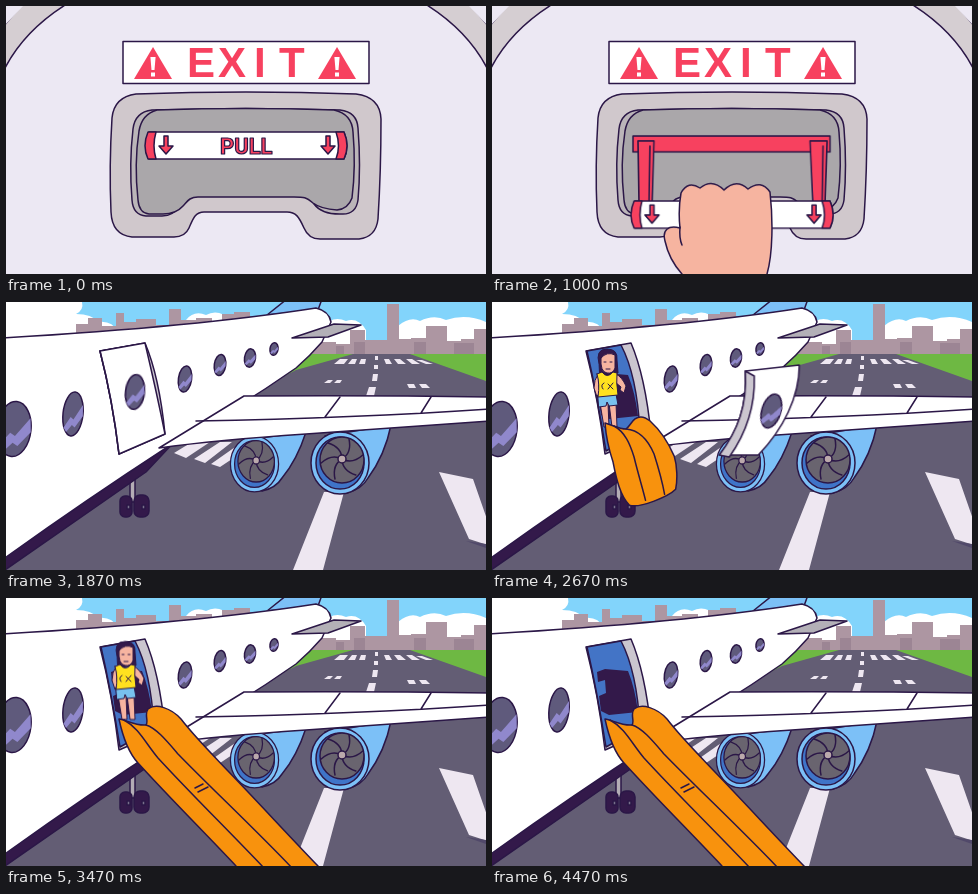
An HTML page that plays this animation: 480 by 268 pixels, repeating every 4.54 s.

```html
<!DOCTYPE html>
<html lang="en">
<head>
<meta charset="utf-8">
<title>Emergency exit</title>
<style>
html, body { margin: 0; width: 100%; height: 100%; overflow: hidden; background: #ece8f3; }
svg { display: block; width: 100%; height: 100%; }
.ink, .ink * { stroke: #2b1747; stroke-width: 1.5; stroke-linejoin: round; stroke-linecap: round; }
.flat, .flat * { stroke: none; }
.line { fill: none; }
.red { fill: #f7415f; }
.white { fill: #fff; }
.skin { fill: #f6b4a0; }
.hair { fill: #33194a; }
.orange { fill: #f8920d; }
.glass { fill: #5f5a7c; vector-effect: non-scaling-stroke; }
.shine { fill: #9088cc; stroke: none !important; }
.thin, .thin * { stroke-width: 1; }
#exit-text { font: bold 42px "Liberation Sans", sans-serif; }
#pull-text { font: bold 22px Roboto, sans-serif; stroke-width: 1.2; }

/* one shared clock for every moving part */
.move { animation: 4540ms linear infinite; }
#plane { animation-name: plane; animation-timing-function: step-end; }
#bar { animation-name: bar; transform-origin: 240px 140px; }
#arms { animation-name: arms; transform-origin: 240px 138px; }
#hand { animation-name: hand; }
#door { animation-name: door; }
#panel { animation-name: panel; }
#rim { animation-name: rim; }
#pane { animation-name: pane; }
#stand { animation-name: stand; }
#rider { animation-name: rider; }
#slide { animation-name: show-slide; animation-timing-function: step-end; }
#marks { animation-name: show-marks; animation-timing-function: step-end; }
#body { animation-name: body; }
#ridge1 { animation-name: ridge1; }
#ridge2 { animation-name: ridge2; }

@keyframes plane { 0% { visibility: hidden } 35.24%, 100% { visibility: visible } }
@keyframes bar {
  0%, 13.2% { transform: none; animation-timing-function: ease-in-out }
  22% { transform: translateY(69px) }
  30.8%, 100% { transform: translateY(76px) scale(1.06) }
}
@keyframes arms {
  0%, 13.2% { transform: scaleY(0); animation-timing-function: ease-in-out }
  22% { transform: none }
  30.8%, 100% { transform: scale(1.06, 1.16) }
}
@keyframes hand {
  0%, 1.5% { transform: translateY(95px); animation-timing-function: ease-out }
  10.3%, 13.2% { transform: translateY(-69px); animation-timing-function: ease-in-out }
  22% { transform: none }
  30.8%, 100% { transform: translateY(11px) }
}
@keyframes door {
  0%, 58.8% { transform: none }
  60.1% { transform: translate(52px, -38px) }
  61.7% { transform: translate(112px, -92px) }
  63.5%, 100% { transform: translate(130px, -190px) }
}
@keyframes panel {
  0%, 50% { d: path("M94 49L139 41C147 75 153 102 159 132L113 152C109 118 103 84 94 49Z") }
  58.8%, 100% { d: path("M252 70L306 64C306 96 290 128 265 154L226 154C245 129 254 104 252 70Z") }
}
@keyframes rim {
  0%, 50% { d: path("M94 49L94 49C103 84 109 118 113 152L113 152C109 118 103 84 94 49Z") }
  58.8%, 100% { d: path("M252 70L261 75C262 106 253 132 236 156L226 154C245 129 254 104 252 70Z") }
}
@keyframes pane {
  0%, 50% { transform: translate(129px, 90px) rotate(6deg) }
  58.8%, 100% { transform: translate(278px, 110px) rotate(17deg) }
}
@keyframes stand {
  0%, 73.3% { transform: none }
  75% { transform: translateY(5px) }
  77.9% { transform: translate(8px, -12px) }
  79.3% { transform: translate(15px, 4px); opacity: 1 }
  79.4%, 100% { transform: translate(15px, 4px); opacity: 0 }
}
@keyframes rider {
  0%, 79.3% { transform: translate(-40px, -57px); opacity: 0 }
  79.4% { transform: translate(-40px, -57px); opacity: 1 }
  82.2% { transform: translate(-29px, -34px) }
  86.6% { transform: none; animation-timing-function: ease-in }
  95.4%, 100% { transform: translate(128px, 135px); opacity: 1 }
}
@keyframes show-slide { 0% { visibility: hidden } 55%, 100% { visibility: inherit } }
@keyframes show-marks { 0% { opacity: 0 } 65%, 100% { opacity: 1 } }
/* packed, folded out, whipping down, taut, sagging under the rider */
@keyframes body {
  0%, 55% { d: path("M113 121C113 124 114 127 116 130C118 134 122 136 126 136C132 136 140 134 144 130C146 127 147 122 147 120C147 116 146 114 145 113C144 112 143 111 142 112C138 116 141 124 138 126C130 127 120 123 113 121Z") }
  58.8% { d: path("M113 121C114 135 117 148 121 160C124 176 128 194 137 203C148 206 176 194 183 187C185 178 185 164 182 154C176 140 168 128 158 119C152 114 147 114 143 117C139 120 138 124 134 127C128 127 120 123 113 121Z") }
  66.1% { d: path("M113 121C117 140 122 154 132 166C158 198 178 230 245 268C270 285 335 275 328 257C308 234 256 214 229 187C205 163 190 138 173 121C162 110 150 106 142 111C138 116 143 124 140 127C130 128 120 122 113 121Z") }
  72%, 79.3%, 98.4%, 100% { d: path("M113 121C117 140 122 154 132 165C162 198 198 234 230 268C255 290 330 290 312 268C285 240 250 202 222 173C205 155 188 138 175 121C165 110 150 105 142 111C138 116 143 124 140 127C130 128 120 122 113 121Z") }
  86.6%, 91% { d: path("M113 121C117 142 122 158 134 172C158 203 195 232 245 268C268 290 350 290 328 268C296 242 262 222 232 192C204 168 190 138 174 121C162 110 150 106 142 111C138 116 143 124 140 127C130 128 120 122 113 121Z") }
}
@keyframes ridge1 {
  0%, 55% { d: path("M122 124C124 126 125 128 126 130C126 132 126 134 126 136") }
  58.8% { d: path("M122 124C133 130 138 142 142 155C146 172 150 185 153 198") }
  66.1% { d: path("M118 122C132 130 142 140 152 152C184 192 222 214 274 268") }
  72%, 79.3%, 98.4%, 100% { d: path("M118 122C133 130 140 146 152 160C185 196 220 230 258 270") }
  86.6%, 91% { d: path("M118 122C134 130 140 150 154 168C184 204 225 232 268 270") }
}
@keyframes ridge2 {
  0%, 55% { d: path("M138 126C139 128 140 129 140 130C140 132 140 133 139 134") }
  58.8% { d: path("M134 127C148 128 156 138 162 152C167 168 170 180 172 192") }
  66.1% { d: path("M142 120C152 126 163 136 174 148C206 188 250 206 308 262") }
  72%, 79.3%, 98.4%, 100% { d: path("M140 127C150 130 160 142 172 156C205 190 250 232 286 270") }
  86.6%, 91% { d: path("M140 127C155 134 163 148 180 168C208 200 260 226 300 270") }
}
</style>
</head>
<body>
<svg viewBox="0 0 480 268" preserveAspectRatio="none">
  <defs>
    <g id="warning">
      <path class="red flat" d="M0 -16L19 16H-19Z"/>
      <path class="white flat" d="M-2.6 -6H2.6L1.5 7H-1.5ZM-2 9.5H2V13.5H-2Z"/>
    </g>
    <path id="arrow" class="red" d="M-2 -9H2V1H7L0 9L-7 1H-2Z"/>
    <g id="window">
      <ellipse class="glass" rx="10" ry="20"/>
      <path class="shine" d="M9 -9L1 5L-2 3L-8 13L-5 17L0 10L3 12L10 1Z"/>
    </g>
    <g id="fan">
      <ellipse fill="#7cc0f7" rx="29" ry="31"/>
      <ellipse fill="#3f74c8" rx="24" ry="26"/>
      <ellipse fill="#69646f" cx="2" cy="-3" rx="22" ry="23"/>
      <g class="line">
        <path id="blade" d="M2 -4Q12 -10 9 -24"/>
        <use href="#blade" transform="rotate(60 2 -4)"/>
        <use href="#blade" transform="rotate(120 2 -4)"/>
        <use href="#blade" transform="rotate(180 2 -4)"/>
        <use href="#blade" transform="rotate(240 2 -4)"/>
        <use href="#blade" transform="rotate(300 2 -4)"/>
      </g>
      <circle fill="#bba9ac" cx="2" cy="-4" r="4"/>
    </g>
  </defs>

  <!-- exit handle -->
  <g class="ink">
    <rect class="flat" width="480" height="268" fill="#ece8f3"/>
    <path fill="#d5ced2" d="M-4 68C10 38 34 14 64 -4H18L-4 22Z"/>
    <path fill="#d5ced2" d="M484 68C470 38 446 14 416 -4H462L484 22Z"/>
    <path class="flat" fill="#ece8f3" d="M0 0H17L0 18ZM480 0H463L480 18Z"/>
    <rect class="white" x="117" y="35.5" width="246" height="42"/>
    <use href="#warning" x="147" y="57"/>
    <use href="#warning" x="331" y="57"/>
    <text id="exit-text" class="red flat" x="181 212 248 273" y="71">EXIT</text>

    <path fill="#d0c8cc" d="M130 88Q240 84 350 88Q374 91 375 113Q375 165 372 213Q370 231 353 233H316Q303 234 298 222C293 211 290 206 281 206H198C189 206 187 213 183 222Q179 231 168 231H126Q106 229 105 206Q103 160 106 112Q108 91 130 88Z"/>
    <path fill="#bbb5b9" d="M146 104Q240 101 334 104Q351 106 352 122Q355 160 352 194Q350 208 337 208Q316 209 308 198C303 190 300 184 290 184H190C179 184 177 190 173 199Q168 210 156 210H140Q127 209 126 194Q123 158 127 123Q129 106 146 104Z"/>
    <path fill="#aaa7aa" d="M151 104Q240 101 328 104Q346 108 347 126Q350 160 346 192Q342 203 331 204Q315 203 307 197C300 191 298 191 288 191H192C183 191 181 196 177 200Q170 208 157 208H143Q133 207 132 194Q128 158 133 125Q136 108 151 104Z"/>

    <g id="arms" class="move red">
      <rect x="141" y="130" width="197" height="16"/>
      <path d="M146 135H162L160 199H147Z"/>
      <path d="M318 135H335L333 199H321Z"/>
      <path class="line" d="M158 140L157 199M331 140L330 199"/>
    </g>
    <g id="bar" class="move">
      <path class="white" d="M143 126H338Q344 140 338 153H143Q137 140 143 126Z"/>
      <path class="red" d="M142 126H150Q146 140 150 153H142Q136 140 142 126ZM330 126H338Q344 140 338 153H330Q335 140 330 126Z"/>
      <use href="#arrow" x="160" y="139"/>
      <use href="#arrow" x="322" y="139"/>
      <text id="pull-text" class="red" x="214" y="148">PULL</text>
    </g>
    <g id="hand" class="move">
      <path class="skin" d="M188 222C176 219 170 224 173 235C176 249 181 258 190 268V370H272L275 268C281 247 281 213 278 186Q269 173 256 183Q244 172 232 184Q220 172 208 182Q196 174 189 187Q186 204 188 222Z"/>
      <path class="line" d="M188 221Q187 232 190 239"/>
    </g>
  </g>

  <!-- plane -->
  <g id="plane" class="move ink">
    <g class="flat">
      <rect width="480" height="268" fill="#82d4fb"/>
      <path class="white" d="M0 0H76Q78 8 70 12Q86 12 92 20Q106 18 112 30V40H0ZM180 18Q188 8 200 13Q212 6 226 18V40H180ZM316 26Q326 13 340 19Q352 15 360 28V50H316ZM392 24Q404 14 414 19Q428 12 440 18Q460 11 480 20V52H392Z"/>
      <path fill="#ad96a2" d="M70 40V22H82V16H96V24H110V11H118V20H130V17H150V23H163V7H175V18H190V16H206V22H216V12H228V10H244V14H258V20H270V40ZM290 54V40H330V42H344V28H359V38H381V2H393V37H405V36H420V24H441V39H455V37H468V27H480V54Z"/>
      <path fill="#9c8594" d="M163 23H175V40H163ZM330 44H338V52H330ZM348 40H359V52H348ZM408 40H420V52H408ZM448 41H468V52H448Z"/>
      <path fill="#6eb843" d="M240 100L300 52H480V90Z"/>
      <path fill="#635d74" d="M347 52H404L480 79V268H0V180L240 94L290 68Z"/>
      <g fill="#eee7f1">
        <path d="M334 57H342L338 62H328ZM346 57H351L349 62H342ZM355 57H360L359 62H353ZM378 57H383L386 62H380ZM388 57H394L400 62H392ZM400 57H406L414 62H406ZM410 58H416L427 62H420Z"/>
        <path d="M369 54H372V58H369ZM368 63H372V67H368ZM367 72H372L371 79H366ZM363 85H370L368 94H360Z"/>
        <path d="M322 78H327L324 81H318ZM331 78H336L334 81H328ZM401 82H408L410 86H403ZM413 82H420L424 86H416Z"/>
        <path d="M318 190H338L317 268H287ZM433 170L467 177L491 246L463 237Z"/>
        <path d="M168 151L186 140H204L180 156ZM188 157L214 140H226L199 161ZM205 162L232 143L235 151L214 165Z"/>
      </g>
      <path fill="#51496a" d="M460 239L480 242V246Z"/>
    </g>

    <g>
      <path fill="#b4adb5" d="M124 172H129V200H124Z"/>
      <g class="hair">
        <rect x="114" y="194" width="12" height="21" rx="5"/>
        <rect x="128" y="193" width="15" height="22" rx="6"/>
      </g>
      <path fill="#77708a" d="M121 203H124V207H121ZM136 203H139V207H136Z"/>
    </g>

    <path fill="#7cc0f7" d="M261 13L281 -3H316L312 8Z"/>
    <path class="hair" d="M-4 250L110 172L170 138L140 170L-4 270Z"/>
    <path class="white" d="M-4 36C100 30 220 20 310 6Q323 9 325 20L316 40Q304 54 290 66Q230 108 160 146Q80 198 -4 258Z"/>
    <path fill="#b3b0b7" d="M286 36L328 22L355 23L322 35Z"/>

    <path fill="#7cc0f7" d="M239 138L256 189Q270 186 276 176Q291 158 300 130Z"/>
    <path fill="#7cc0f7" d="M319 134L341 191Q356 187 362 176Q379 153 385 123Z"/>
    <use href="#fan" transform="translate(248.5 162) scale(.83 .9)"/>
    <use href="#fan" transform="translate(334 161)"/>
    <path class="white" d="M153 146L238 94Q360 93 484 95V119L300 132Q210 138 153 146Z"/>
    <path class="line" d="M190 119Q350 116 484 107M334 95L319 115M425 95L415 111"/>

    <use href="#window" transform="translate(8 127) rotate(6) scale(1.7 1.38)"/>
    <use href="#window" transform="translate(67 112) rotate(6) scale(1 1.1)"/>
    <use href="#window" transform="translate(179 77) rotate(8) scale(.66)"/>
    <use href="#window" transform="translate(214 63) rotate(8) scale(.57 .53)"/>
    <use href="#window" transform="translate(244 56) rotate(8) scale(.55 .46)"/>
    <use href="#window" transform="translate(268 47) rotate(8) scale(.4 .32)"/>

    <!-- doorway -->
    <path fill="#cbc6cf" d="M94 49L139 41C148 62 155 92 159 132L113 152C109 118 103 84 94 49Z"/>
    <path fill="#4374c6" d="M95 49L129 43C139 62 146 92 148 130L114 149C109 118 103 84 95 49Z"/>
    <path class="hair flat" d="M105 74L113 71L136 73Q143 90 146 114L117 117L109 113L107 98L114 95L113 82L106 84Z"/>

    <g id="stand" class="move thin">
      <path class="hair" d="M107 62Q103 47 115 47Q126 47 125 58L126 71L108 73Z"/>
      <path class="skin" d="M124 72Q130 75 134 84L132 91L128 88L129 85L123 80ZM106 72Q102 78 102 86L105 95L109 94L107 86ZM108 101L112 125H117L116 101ZM117 101L120 125H125L124 101Z"/>
      <path class="skin" d="M109 56Q115 49 123 53L123 66Q121 72 115 71Q108 70 109 56Z"/>
      <path fill="#78c1ee" d="M106 93L124 92L126 103L117 104L115 100L114 104L107 105Z"/>
      <path fill="#ffe11f" d="M105 72L110 70Q115 77 121 70L125 71Q124 80 126 93L106 95Q108 82 105 72Z"/>
      <path class="line" d="M112 81Q108 83 111 87M116 82L121 87M121 81L116 87M112 60H114M118 60H120M114 67H118"/>
    </g>

    <g id="door" class="move">
      <path id="panel" class="move white"/>
      <path id="rim" class="move" fill="#cbc6cf"/>
      <g id="pane" class="move"><use href="#window" transform="scale(.95 .87)"/></g>
    </g>

    <g id="slide" class="move">
      <path id="body" class="move orange"/>
      <path id="ridge1" class="move line"/>
      <path id="ridge2" class="move line"/>
      <path id="marks" class="move line" d="M189 190L197 186M192 194L202 189"/>
    </g>

    <g id="rider" class="move thin">
      <path class="hair" d="M158 152Q156 139 166 138Q176 139 175 151L176 165L162 167Z"/>
      <path class="skin" d="M176 165Q186 168 191 175L201 177L200 181L189 180L177 172ZM190 180Q207 177 217 184L230 189L227 194L211 188L192 190ZM184 188Q199 188 206 196L218 204L214 208L201 200L187 195Z"/>
      <path class="white" d="M224 191L232 187L235 191L224 197ZM211 208L219 203L223 206L213 212Z"/>
      <path class="skin" d="M160 150Q167 142 174 148L175 160Q173 167 168 166Q161 165 160 150Z"/>
      <path fill="#78c1ee" d="M174 185L188 178Q196 178 200 184L193 187L197 191L190 196L179 195Z"/>
      <path fill="#ffe11f" d="M162 167L166 165Q171 170 176 164L180 166Q182 174 190 179L176 190Q166 181 162 167Z"/>
      <path class="skin" d="M162 167Q160 176 168 184L176 192L179 190L171 181L166 173Z"/>
      <path class="line" d="M171 173L176 177M176 172L173 178M163 154H165M169 154H171M167 161H169"/>
    </g>
  </g>
</svg>
</body>
</html>
```
